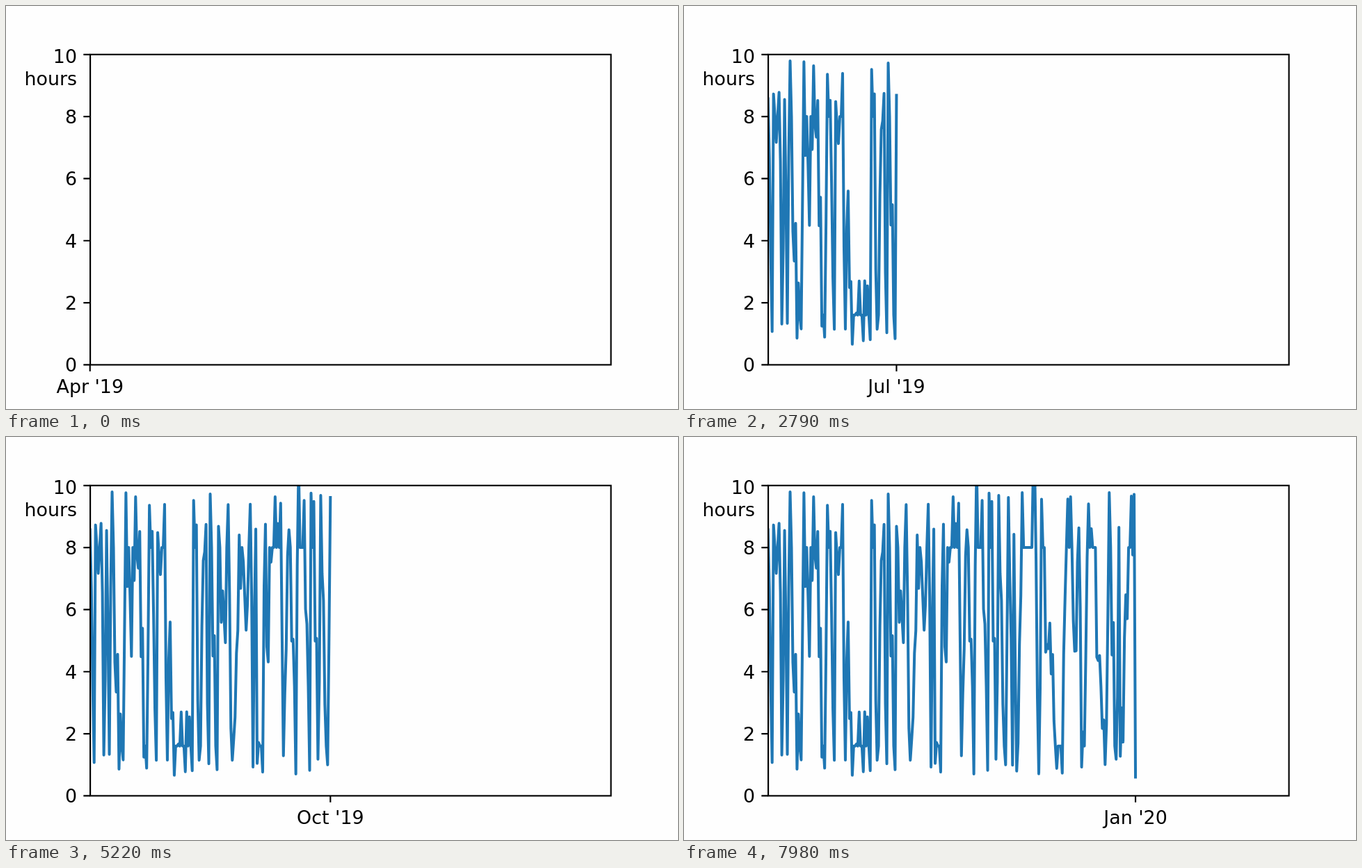
Write an HTML page that moves like this. It is 966 px wide and 580 px high and loops after 8 s.

```html
<!DOCTYPE html>
<html lang="en">
<head>
<meta charset="utf-8">
<title>Hours per day</title>
<style>
  html, body { margin: 0; width: 100%; height: 100%; overflow: hidden; background: #fefefe; }
  svg { display: block; width: 966px; height: 580px; }
  text { font: 26.83px "DejaVu Sans", sans-serif; fill: #000; }
  .axis { fill: none; stroke: #000; stroke-width: 2.15; }
  .line { fill: none; stroke: #1f77b4; stroke-width: 4.03; stroke-linejoin: round; stroke-linecap: square; }
</style>
</head>
<body>
<svg viewBox="0 0 966 580">
  <defs><clipPath id="plot"><rect x="120.75" y="69.6" width="748.65" height="446.6"/></clipPath></defs>
  <g clip-path="url(#plot)"><path id="line" class="line"/></g>
  <rect class="axis" x="121.1" y="69.8" width="748.5" height="446.6"/>
  <path id="ticks" class="axis"/>
  <g id="labels" text-anchor="end"></g>
  <g id="marker">
    <path class="axis" d="M0 516.4v9.4"/>
    <text id="month" y="556.6" text-anchor="middle"></text>
  </g>
</svg>
<script>
const LOOP = 8000, STEP = 30, LAST = 266;
const LEFT = 120.75, BOTTOM = 516.2, DAY = 1.986, HOUR = 44.66;
const MONTHS = ["Jan", "Feb", "Mar", "Apr", "May", "Jun", "Jul", "Aug", "Sep", "Oct", "Nov", "Dec"];

// Days on which the curve reaches a typical level.
const over = [151, 192, 193];
const high = [16, 26, 33, 43, 54, 75, 87, 100, 116, 134, 138, 155, 160, 162, 167, 174, 184, 198, 217, 219, 232, 247, 263, 265];
const raised = [0, 4, 8, 12, 36, 45, 49, 77, 84, 93, 108, 120, 127, 136, 144, 178, 225, 234, 254];
const middle = [30, 58, 89, 95, 98, 113, 128, 142, 202, 222, 230, 240];
const low = [3, 10, 14, 21, 24, 39, 41, 48, 56, 61, 69, 74, 79, 86, 92, 103, 118, 121, 125, 140,
  149, 159, 165, 172, 177, 180, 196, 209, 213, 227, 244, 252, 255, 266];

const $ = id => document.getElementById(id);
const xOf = day => LEFT + day * DAY;
const yOf = h => BOTTOM - h * HOUR;

// Seeded noise in -1..1
const noise = i => {
  const s = Math.sin(i * 12.9898 + 4) * 43758.5453;
  return (s - Math.floor(s)) * 2 - 1;
};

function makeHours() {
  const fixed = new Map();
  const place = (days, level, spread) =>
    days.forEach(d => fixed.set(d, level + spread * noise(d)));
  place(over, 10.7, .2);
  place(high, 9.6, .25);
  place(raised, 8.6, .2);
  place(middle, 5, .6);
  place(low, 1, .35);
  fixed.set(LAST, .6);

  const days = [...fixed.keys()].sort((a, b) => a - b);
  const hours = [];
  for (let i = 0; i <= LAST; i++) {
    if (fixed.has(i)) { hours.push(fixed.get(i)); continue; }
    const k = days.findIndex(d => d > i), a = days[k - 1], b = days[k];
    const base = fixed.get(a) + (fixed.get(b) - fixed.get(a)) * (i - a) / (b - a);
    hours.push(Math.max(1.6, Math.min(8, base + 2 * noise(i))));
  }
  return hours;
}

function addLabel(str, y) {
  const el = document.createElementNS("http://www.w3.org/2000/svg", "text");
  el.setAttribute("x", 102);
  el.setAttribute("y", y);
  el.textContent = str;
  $("labels").append(el);
}

const points = makeHours().map((h, i) => `${xOf(i).toFixed(2)} ${yOf(h).toFixed(2)}`);

let ticks = "";
for (let h = 0; h <= 10; h += 2) {
  ticks += `M${LEFT} ${yOf(h) + .2}h-9.4`;
  addLabel(h, yOf(h) + (h === 10 ? 12.2 : 10));
}
addLabel("hours", 114);
$("ticks").setAttribute("d", ticks);

let shown = -1;
function draw(t) {
  const n = Math.min(LAST, Math.floor(t / STEP + .001));
  if (n === shown) return;
  shown = n;
  const date = new Date(Date.UTC(2019, 3, 20 + n));
  $("line").setAttribute("d", "M" + points.slice(0, n + 1).join("L"));
  $("marker").setAttribute("transform", `translate(${xOf(n)})`);
  $("month").textContent = `${MONTHS[date.getUTCMonth()]} '${date.getUTCFullYear() % 100}`;
}

const start = performance.now();
function tick() {
  draw((performance.now() - start) % LOOP);
  requestAnimationFrame(tick);
}
tick();
</script>
</body>
</html>
```
